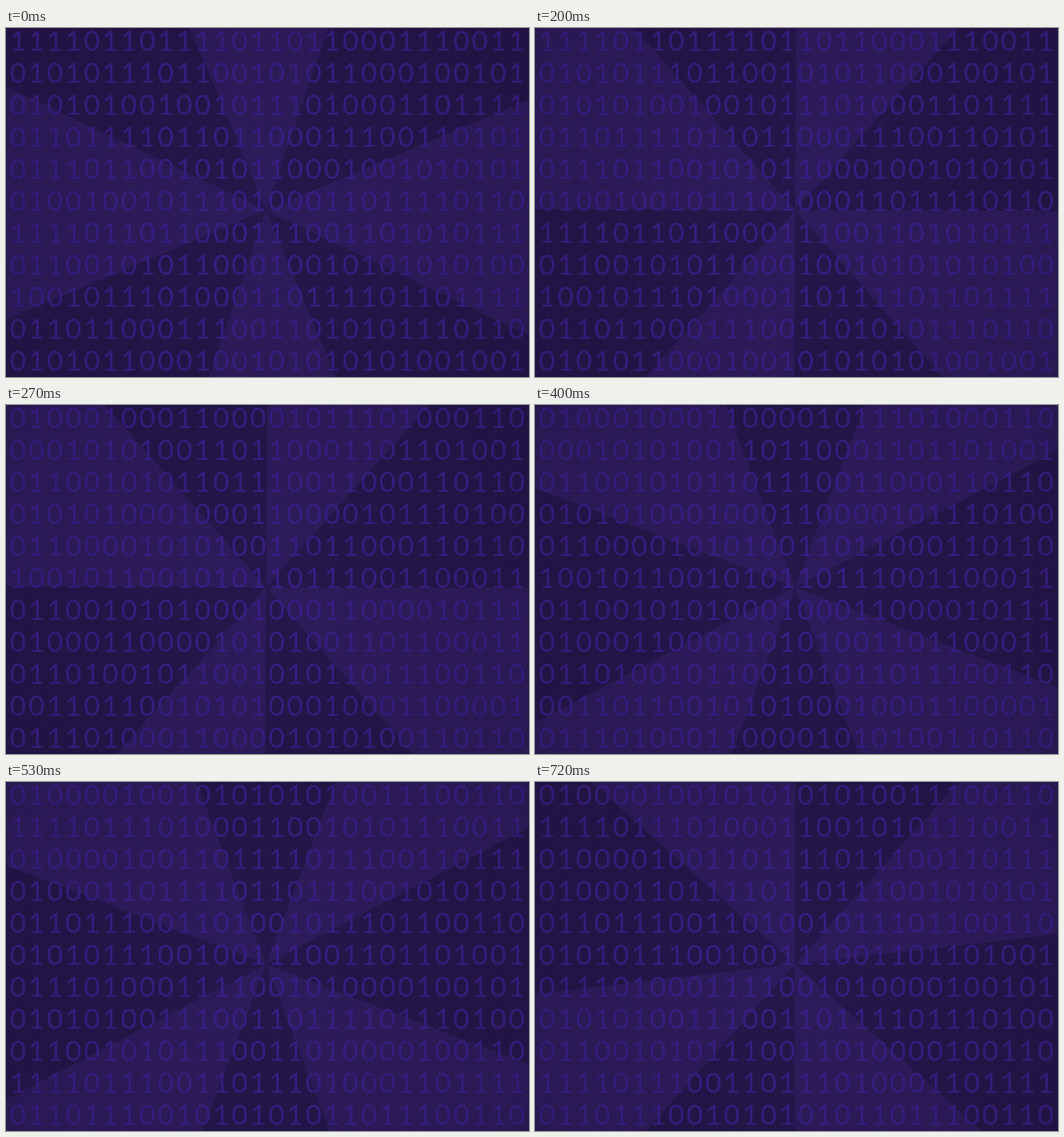
An HTML page for the animation above (800 ms loop, 916 by 611 pixels).

```html
<!DOCTYPE html>
<html lang="en">
<head>
<meta charset="utf-8">
<title>Binary rays</title>
<style>
  html, body { margin: 0; width: 100%; height: 100%; overflow: hidden; background: #221546; }
  svg { display: block; width: 100%; height: 100%; }
  text { font: 400 49px Lato, "DejaVu Sans", sans-serif; text-anchor: middle; fill: url(#ink); }
</style>
</head>
<body>
<svg viewBox="0 0 916 611" preserveAspectRatio="none">
  <defs>
    <radialGradient id="base" gradientUnits="userSpaceOnUse" cx="455" cy="319" r="540">
      <stop offset="0" stop-color="#24174a"/>
      <stop offset="1" stop-color="#211444"/>
    </radialGradient>
    <radialGradient id="glow" gradientUnits="userSpaceOnUse" cx="455" cy="319" r="540">
      <stop offset="0" stop-color="#2d1c5b"/>
      <stop offset="1" stop-color="#291953"/>
    </radialGradient>
    <radialGradient id="ink" gradientUnits="userSpaceOnUse" cx="455" cy="319" r="540">
      <stop offset="0" stop-color="#381e84"/>
      <stop offset="1" stop-color="#331b76"/>
    </radialGradient>
  </defs>
  <rect width="916" height="611" fill="url(#base)"/>
  <path id="rays" fill="url(#glow)"/>
  <g id="digits"></g>
</svg>
<script>
const LOOP = 800;
const COLS = 28;
const ROWS = 11;
const CENTER = { x: 455.4, y: 319 };
const REACH = 900;

// The fan keeps its shape and turns in four steps (degrees).
const WEDGES = [[0, 41.6], [89.9, 138.2]];
const TURNS = [-112.7, -89.7, -69.1, -48.1];

// Each page repeats a phrase as 8-bit ASCII, starting at a given bit.
const PAGES = [
  { from: 0, phrase: "WebUItools", firstBit: 52 },
  { from: 270, phrase: "DataScience", firstBit: 0 },
  { from: 530, phrase: "BUNotesBostonUniversity", firstBit: 0 }
];

const range = n => Array.from({ length: n }, (_, i) => i);

function binaryRows({ phrase, firstBit }) {
  const bits = [...phrase]
    .map(char => char.charCodeAt(0).toString(2).padStart(8, "0"))
    .join("");
  const stream = bits.repeat(6).slice(firstBit);
  return range(ROWS).map(row => stream.slice(row * COLS, (row + 1) * COLS));
}

function rayPoint(angle, reach) {
  const a = angle * Math.PI / 180;
  const x = CENTER.x + reach * Math.cos(a);
  const y = CENTER.y + reach * Math.sin(a);
  return `${x.toFixed(1)} ${y.toFixed(1)}`;
}

function doubleWedge(from, to) {
  const corners = [[from, REACH], [to, REACH], [to, -REACH], [from, -REACH]];
  return "M" + corners.map(corner => rayPoint(...corner)).join("L") + "Z";
}

const fans = TURNS.map(turn =>
  WEDGES.map(([from, to]) => doubleWedge(turn + from, turn + to)).join(""));
const pageRows = PAGES.map(binaryRows);
const rays = document.getElementById("rays");
const digits = document.getElementById("digits");

const columns = range(COLS).map(i => (21 + i * 32.35).toFixed(2)).join(" ");
const lines = range(ROWS).map(i => {
  const line = document.createElementNS("http://www.w3.org/2000/svg", "text");
  line.setAttribute("x", columns);
  line.setAttribute("y", 39.5 + i * 56);
  digits.append(line);
  return line;
});

let shownFan = -1;
let shownPage = -1;

function draw(time) {
  const t = time % LOOP;
  const fan = Math.floor(t / LOOP * TURNS.length);
  const page = PAGES.filter(({ from }) => t >= from).length - 1;
  if (fan !== shownFan) rays.setAttribute("d", fans[fan]);
  if (page !== shownPage) lines.forEach((line, i) => { line.textContent = pageRows[page][i]; });
  shownFan = fan;
  shownPage = page;
}

const start = performance.now();
function tick() {
  draw(performance.now() - start);
  requestAnimationFrame(tick);
}
tick();
</script>
</body>
</html>
```
